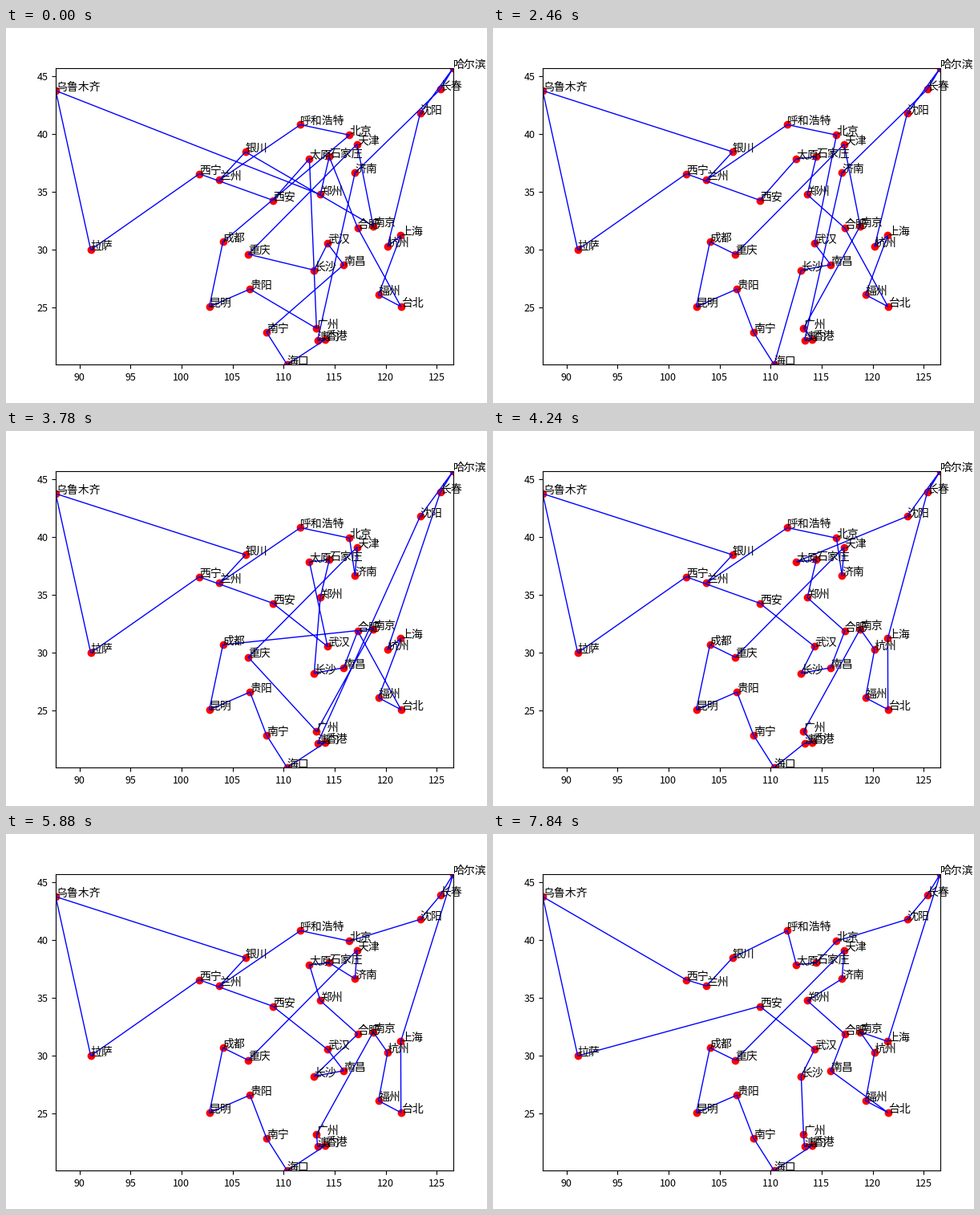
A matplotlib script for the animation above (7990 ms loop, 600 by 467 pixels).

```python
import matplotlib.pyplot as plt
from matplotlib.animation import FuncAnimation

W, H, DPI = 600, 467, 100
FRAMES, INTERVAL = 235, 34

# one-character key: (name, longitude, latitude), listed in starting tour order
CITIES = {
    "济": ("济南", 117.00, 36.65), "澳": ("澳门", 113.33, 22.13),
    "港": ("香港", 114.10, 22.20), "海": ("海口", 110.35, 20.02),
    "邕": ("南宁", 108.33, 22.84), "昌": ("南昌", 115.89, 28.68),
    "汉": ("武汉", 114.31, 30.52), "长": ("长沙", 113.00, 28.21),
    "渝": ("重庆", 106.54, 29.59), "津": ("天津", 117.20, 39.13),
    "宁": ("南京", 118.78, 32.04), "银": ("银川", 106.27, 38.47),
    "兰": ("兰州", 103.73, 36.03), "呼": ("呼和浩特", 111.65, 40.82),
    "京": ("北京", 116.46, 39.92), "蓉": ("成都", 104.06, 30.67),
    "昆": ("昆明", 102.73, 25.04), "筑": ("贵阳", 106.71, 26.57),
    "穗": ("广州", 113.23, 23.16), "太": ("太原", 112.53, 37.87),
    "秦": ("西安", 108.95, 34.27), "青": ("西宁", 101.74, 36.56),
    "拉": ("拉萨", 91.11, 29.97), "乌": ("乌鲁木齐", 87.68, 43.77),
    "郑": ("郑州", 113.60, 34.76), "石": ("石家庄", 114.48, 38.03),
    "合": ("合肥", 117.27, 31.86), "台": ("台北", 121.50, 25.05),
    "福": ("福州", 119.30, 26.08), "沪": ("上海", 121.48, 31.22),
    "杭": ("杭州", 120.19, 30.26), "沈": ("沈阳", 123.38, 41.80),
    "哈": ("哈尔滨", 126.63, 45.75), "春": ("长春", 125.35, 43.88),
}

# time in ms: tour edits; "a~b" reverses a..b, "seg>x" puts seg after x
STEPS = {
    130: "长>邕",
    460: "穗>海 邕~宁 哈>春",
    610: "筑昆蓉>邕 哈>沈",
    910: "海>长",
    1220: "银~京",
    1390: "太~乌",
    1690: "京~银",
    2000: "银~京",
    2150: "石>太",
    2460: "汉~蓉",
    2540: "济>汉",
    2920: "汉>青",
    3090: "穗~海",
    3240: "汉>秦",
    3390: "长昌>郑",
    3550: "渝津>穗",
    3780: "沈~春",
    3930: "宁穗>沈",
    4010: "长昌合郑太石沈哈春沪台福杭>汉 澳>港",
    4240: "太>石",
    4620: "长>昌",
    4790: "春>沈",
    5090: "港>澳",
    5340: "京~太",
    5880: "石>济",
    6280: "兰>乌",
    6600: "青>乌",
    6900: "太石>呼",
    7210: "长>宁",
    7520: "汉~宁",
    7840: "宁~台",
}


def edit(tour, op):
    if "~" in op:
        i, j = sorted(tour.index(c) for c in op.split("~"))
        return tour[:i] + tour[i:j + 1][::-1] + tour[j + 1:]
    seg, after = op.split(">")
    rest = "".join(c for c in tour if c not in seg)
    return rest.replace(after, after + seg)


def build_tours():
    tour = "".join(CITIES)
    tours = [(0, tour)]
    for time, ops in STEPS.items():
        for op in ops.split():
            tour = edit(tour, op)
        tours.append((time, tour))
    return tours


TOURS = build_tours()

plt.rcParams["font.family"] = "Noto Sans CJK JP"
fig = plt.figure(figsize=(W / DPI, H / DPI), dpi=DPI, facecolor="white")
ax = fig.add_axes([62 / W, 47.8 / H, 496 / W, 369.6 / H])

names, lon, lat = zip(*CITIES.values())
ax.scatter(lon, lat, color="red")
for name, x, y in zip(names, lon, lat):
    ax.text(x, y, name, fontsize=10)
route, = ax.plot([], [], color="blue", lw=1)
ax.set_xlim(min(lon), max(lon))
ax.set_ylim(min(lat), max(lat))
ax.set_xticks(range(90, 130, 5))
ax.set_yticks(range(25, 50, 5))
ax.tick_params(labelsize=9)


def update(k):
    now = (k + 1) * INTERVAL
    tour = [t for time, t in TOURS if time < now][-1]
    points = [CITIES[c][1:] for c in tour + tour[0]]
    route.set_data(*zip(*points))
    return route,


anim = FuncAnimation(fig, update, frames=FRAMES, interval=INTERVAL,
                     repeat=True, repeat_delay=0, blit=False)
plt.show()
```
